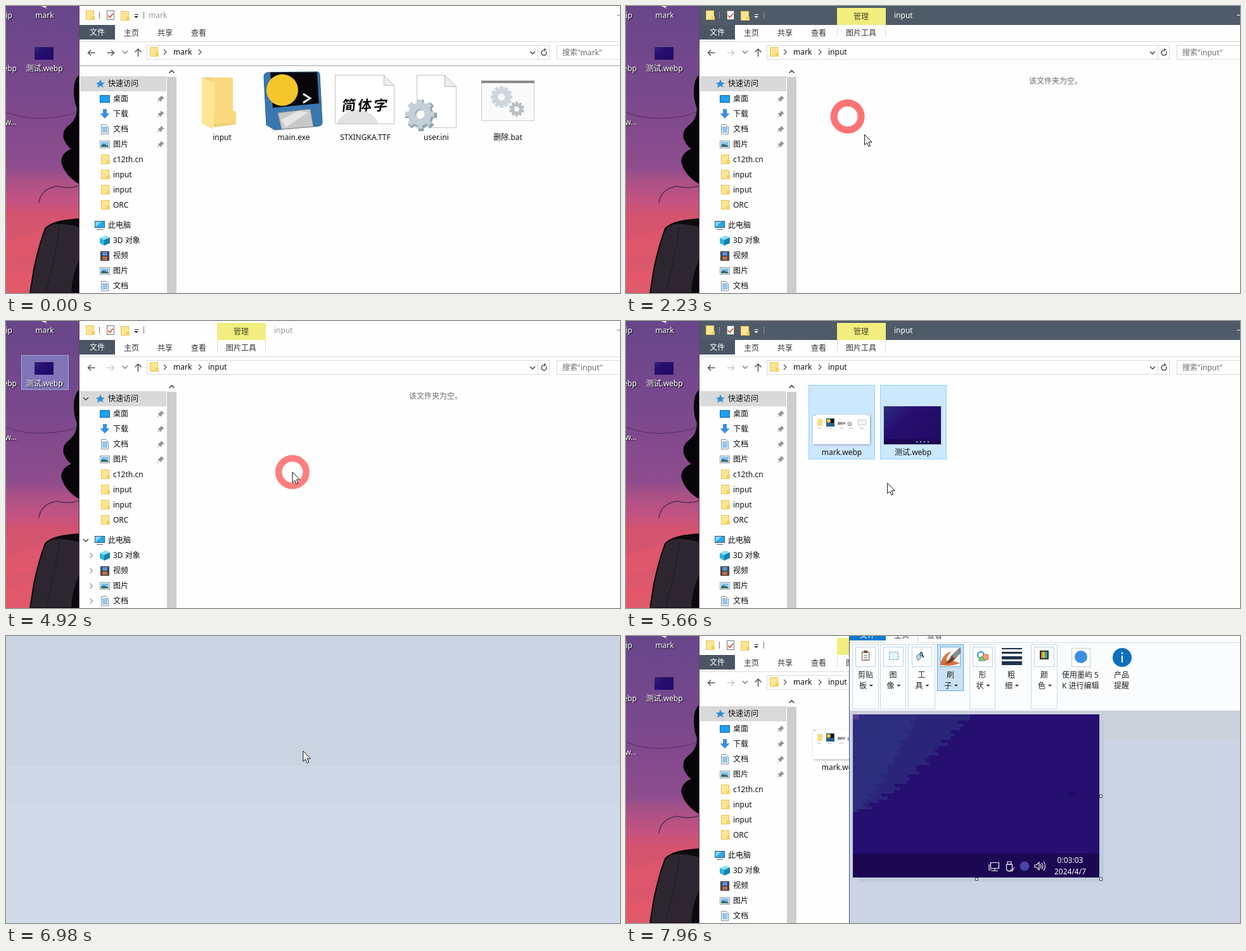
An HTML page with a canvas for the animation above (8000 ms loop, 969 by 454 pixels).

```html
<!DOCTYPE html>
<html lang="zh-CN">
<head>
<meta charset="utf-8">
<style>
html,body{margin:0;width:100%;height:100%;overflow:hidden;background:#fff}
canvas{display:block}
</style>
</head>
<body>
<canvas id="stage" width="969" height="454"></canvas>
<script>
const W = 969, H = 454, LOOP = 8000;
const c = document.getElementById('stage').getContext('2d');
const FONT = '"Noto Sans","Noto Sans CJK SC",sans-serif';

function box(x, y, w, h, fill, stroke) {
  if (fill) { c.fillStyle = fill; c.fillRect(x, y, w, h); }
  if (stroke) { c.strokeStyle = stroke; c.lineWidth = 1; c.strokeRect(x + .5, y + .5, w - 1, h - 1); }
}
function path(d, fill, stroke, lw = 1) {
  const p = new Path2D(d);
  if (fill) { c.fillStyle = fill; c.fill(p); }
  if (stroke) { c.strokeStyle = stroke; c.lineWidth = lw; c.stroke(p); }
}
function at(x, y, draw) {
  c.save(); c.translate(x, y); draw(); c.restore();
}
// y is the middle of the line; the baseline sits on a whole pixel
function text(s, x, y, color = '#111', align = 'left', font = '12px') {
  c.font = font + ' ' + FONT; c.textAlign = align; c.fillStyle = color;
  c.fillText(s, x, Math.round(y + 4));
}
function disc(x, y, r, fill, stroke, lw = 1) {
  c.beginPath(); c.arc(x, y, r, 0, 7);
  if (fill) { c.fillStyle = fill; c.fill(); }
  if (stroke) { c.strokeStyle = stroke; c.lineWidth = lw; c.stroke(); }
}
function shade(x0, y0, x1, y1, stops) {
  const g = c.createLinearGradient(x0, y0, x1, y1);
  stops.forEach(([p, col]) => g.addColorStop(p, col));
  return g;
}
const clamp = v => Math.max(0, Math.min(1, v));

// ---- pointer motion: time, x, y ----
const track = [
  [180, 700, 476], [520, 457, 290], [1000, 457, 285], [1340, 80, 210], [1440, 84, 200],
  [1760, 341, 152], [2150, 341, 152], [2190, 349, 174], [2230, 376, 203], [2310, 420, 229],
  [2560, 459, 245], [2670, 459, 245], [3000, 300, 190], [3300, 90, 100], [3470, 75, 125],
  [3500, 75, 125], [3560, 47, 95], [3600, 37, 86], [3700, 18, 76], [3900, 8, 72],
  [4400, 8, 72], [4720, 452, 239], [5300, 452, 239], [5560, 400, 290], [5800, 430, 210],
  [6080, 469, 182], [7300, 469, 182], [7320, 440, 60], [7340, 433, -24]
];
function pointer(t) {
  let i = track.findIndex(k => k[0] > t);
  if (i < 0) i = track.length;
  if (!i) return track[0].slice(1);
  const a = track[i - 1], b = track[i] || a;
  const p = b === a ? 0 : (t - a[0]) / (b[0] - a[0]);
  return [a[1] + (b[1] - a[1]) * p, a[2] + (b[2] - a[2]) * p];
}
const clicks = [550, 1850, 2095, 3500, 4760, 6300, 6480], FADE = 430;

function clickRing(t) {
  const last = clicks.filter(k => k <= t).pop();
  if (last === undefined || t - last > FADE) return;
  const age = (t - last) / FADE, [x, y] = pointer(t - 40);
  const inner = 13.5 + Math.min(3, age * 8);
  disc(x, y, (27 + inner) / 2, null, `rgba(255,0,0,${.8 * (1 - age)})`, 27 - inner);
}
function arrow(t) {
  const [x, y] = pointer(t);
  at(x, y, () => path('M0 0V16.5L3.8 13L6.4 19L9 17.9L6.4 12H11.5Z', '#fff', '#111'));
  if (t >= 6490 && t < 6980) {
    disc(x + 14, y, 6, null, '#e8f4ff', 5);
    disc(x + 14, y, 6, null, '#1d8be8', 3);
  }
}

// ---- desktop ----
function label(s, x, y, align = 'center') {
  c.shadowColor = '#000'; c.shadowBlur = 2; c.shadowOffsetX = c.shadowOffsetY = 1;
  text(s, x, y, '#fff', align);
  c.shadowColor = 'transparent';
}
function navy(x, y, w, h) {
  box(x, y, w, h, shade(x, y, x + w * .6, y + h, [[0, '#2d2b7b'], [.45, '#260f70'], [1, '#220c66']]));
}
function desktop(t) {
  box(0, 0, 116, H, shade(0, 0, 0, H, [
    [0, '#68468a'], [.3, '#79488c'], [.56, '#8e4c8d'], [.6, '#a65088'],
    [.68, '#c45380'], [.73, '#d4546f'], [.86, '#d9566c'], [1, '#e05a6a']]));
  path('M0 372Q35 362 62 350L40 398Q20 392 0 402ZM0 425Q25 415 46 420L42 436L0 446Z', 'rgba(236,90,104,.35)');
  path('M0 168Q35 182 78 176T116 160', null, 'rgba(60,36,64,.65)');
  path('M52 312Q54 290 80 285Q100 290 116 284', null, 'rgba(60,36,64,.75)', 1.5);
  path('M116 108Q107 116 107 134Q107 150 112 162Q112 178 100 188Q88 196 91 210Q96 222 103 226Q88 232 87 246Q92 268 116 282Z', '#070508');
  path('M116 338Q76 338 62 352Q52 378 44 416L38 454H116Z', '#2d2630', '#0a080b', 2);
  path('M116 336Q82 338 70 346Q92 343 116 350ZM116 400Q104 425 103 454H116Z', '#0c0a0d');
  path('M84 350Q80 390 62 454', null, '#211b25', 1.5);

  const picked = t >= 3500 && t < 4960;
  if (picked || (t > 3280 && t < 3470)) box(24, 54, 75, 55, 'rgba(150,180,245,.42)', 'rgba(175,205,245,.6)');
  if (picked && pointer(t)[0] < 22) box(-30, 54, 53, 55, 'rgba(150,180,245,.42)', 'rgba(175,205,245,.6)');

  path('M55 0H65L62 2L66 5L60 2Z', '#eee');
  label('ip', 10, 15, 'right');
  label('mark', 61, 15);
  navy(45, 65, 30, 20);
  label('ebp', 17, 99, 'right');
  label('测试.webp', 60.5, 99);
  label('w...', 17, 184, 'right');

  if (t >= 3500 && t < 4210) {
    const [x, y] = pointer(t);
    box(x, y, 75 - x, 126 - y, 'rgba(0,100,215,.3)', '#0a78d7');
  }
}

// ---- small icons ----
function folder(x, y) {
  box(x, y, 13, 15, '#ffe590', '#e8c458');
  path(`M${x + 9} ${y + 15}V${y + 9}H${x + 14}V${y + 15}Z`, '#f3cf62');
}
function picture(y) {
  box(148, y - 6, 16, 12, '#fff', '#8a979f');
  box(150, y - 4, 12, 8, '#7ec3ef');
  path(`M150 ${y + 4}V${y + 1}Q154 ${y - 3} 162 ${y + 3}V${y + 4}Z`, '#356b6c');
}
function doc(y) {
  path(`M150.5 ${y - 7.5}H158L161.5 ${y - 4}V${y + 7.5}H150.5Z`, '#fff', '#7d8c96');
  for (let i = 0; i < 5; i++) box(152, y - 4 + i * 2, 8, 1, '#2b8fd6');
}
function screen(x, y) {
  box(x, y - 7, 16, 11, '#28a8ea', '#31576f');
  path(`M${x + 1} ${y + 3}L${x + 11} ${y - 6}H${x + 1}Z`, '#7fd3fa');
  box(x + 3, y + 6, 10, 1, '#4d6675');
}
function chevron(x, y, d, color, lw = 1.3) {
  const m = { r: 'M-2 -4L2 0L-2 4', d: 'M-4 -2L0 2L4 -2', u: 'M-4 2L0 -2L4 2' };
  at(x, y, () => path(m[d], null, color, lw));
}
function gear(x, y, r, n, color) {
  at(x, y, () => {
    c.fillStyle = color;
    for (let i = 0; i < n; i++) { c.rotate(2 * Math.PI / n); c.fillRect(-r * .17, -r, r * .34, r * .4); }
  });
  disc(x, y, r * .56, null, color, r * .46);
}

// ---- file explorer ----
function chrome(active, inner) {
  box(116, 0, W - 116, H, '#fefefe');
  box(115, 0, 1, H, '#5a4a60');
  if (active) box(116, 0, W - 116, 30, '#4f5b69');
  const ink = active ? '#fff' : '#222', bar = active ? '#8d97a3' : '#777';
  folder(126, 7);
  box(147, 9, 1, 11, bar);
  box(159, 7, 12, 15, '#fff', '#777');
  path('M161 15L164 18L169 12', null, '#d44a2c', 1.7);
  folder(181, 8);
  box(203, 13, 6, 1, ink);
  path('M202 16H209L205.5 19Z', ink);
  box(217, 9, 1, 11, bar);
  if (inner) {
    box(333, 3, 77, 27, '#f1ed7e');
    text('管理', 371, 17, '#48482c', 'center');
    box(333, 30, 1, 20, '#ddd'); box(409, 30, 1, 20, '#ddd');
    text('图片工具', 347, 42.5, '#333');
  }
  text(inner ? 'input' : 'mark', inner ? 423 : 225, 15, active ? '#fff' : '#999');
  box(964, 14, 5, 1, active ? '#fff' : '#888');
  box(116, 30, 56, 23, '#4b5565');
  text('文件', 132, 42, '#fff');
  ['主页', '共享', '查看'].forEach((s, i) => text(s, 186 + 53 * i, 42.5, '#333'));
  box(116, 56, W - 116, 1, '#dadbdc');
  if (!inner) box(116, 94, W - 116, 1, '#a0a0a0');

  const left = 'M5.5 0H-5.5M-1 -4.5L-5.5 0L-1 4.5';
  at(135, 74, () => path(left, null, '#555', 1.5));
  at(165, 74, () => { c.scale(-1, 1); path(left, null, inner ? '#ccc' : '#555', 1.5); });
  chevron(188, 73, 'd', '#777');
  path('M208.5 80V68M203.5 73L208.5 68L213.5 73', null, '#555', 1.5);
  box(222, 62, 636, 23, '#fff', '#d9d9d9');
  box(839, 62, 1, 23, '#d9d9d9');
  folder(227, 65);
  chevron(251, 73, 'r', '#555'); text('mark', 264, 73);
  chevron(306, 73, 'r', '#555');
  if (inner) text('input', 319, 73);
  chevron(831, 74, 'd', '#444', 1.5);
  c.beginPath(); c.arc(849, 74, 4, -.6, 4.6); c.strokeStyle = '#555'; c.lineWidth = 1.5; c.stroke();
  path('M849 67V72L853 69Z', '#555');
  box(869, 62, 120, 23, '#fff', '#d9d9d9');
  text(`搜索"${inner ? 'input' : 'mark'}"`, 878, 74, '#6d6d6d');
}

function nav(t) {
  box(254, 96, 15, 358, '#f1f1f1');
  box(254, 96, 15, 16, '#fff');
  box(254, 112, 15, 342, '#cdcdcd');
  chevron(261.5, 104, 'u', '#444', 1.6);
  box(117, 111, 136, 24, '#d9d9d9');
  path('M149 116L151 121L156 121.5L152 124.5L153.5 129L149 126.5L144 129.5L145.5 124.5L142 121.5L147 121Z', '#2d8fd9');
  text('快速访问', 161, 122.5);
  box(148, 141, 16, 12, '#1ba1f4', '#1264a0');
  path('M153 163H159V170H163.5L156 178L148.5 170H153Z', '#3a8ee0');
  doc(195); picture(219);
  ['桌面', '下载', '文档', '图片', 'c12th.cn', 'input', 'input', 'ORC'].forEach((s, i) => {
    const y = 147 + 24 * i;
    text(s, 169, y - .5);
    if (i > 3) folder(150, y - 8);
    else at(244, y, () => path('M1 -5L5 -1L3 -.5L1 2L.5 4L-4 -.5L-2 -1L.5 -3ZM-2 2L-5 5', '#8b959e', '#8b959e'));
  });
  screen(140, 347); text('此电脑', 161, 346.5);
  path('M148 367L157 363L164 366L155 370Z', '#8be0f2');
  path('M148 367L155 370V379L148 375Z', '#2bb5dc');
  path('M155 370L164 366V375L155 379Z', '#1580b0');
  box(149, 388, 14, 15, '#2b2b2b'); box(152, 389, 8, 6, '#5b8de0'); box(152, 396, 8, 6, '#b76c4c');
  for (let i = 0; i < 5; i++) { box(150, 389 + 3 * i, 1, 1, '#eee'); box(161, 389 + 3 * i, 1, 1, '#eee'); }
  picture(419); doc(443);
  ['3D 对象', '视频', '图片', '文档'].forEach((s, i) => text(s, 169, 370.5 + 24 * i));

  const show = (a, b) => clamp((t - a) / 150) * clamp((b - t) / 150);
  c.globalAlpha = show(1130, 1680) + show(2830, 3490) + show(4480, 5420);
  chevron(126, 123, 'd', '#444', 1.5); chevron(126, 347, 'd', '#444', 1.5);
  for (let i = 0; i < 4; i++) chevron(134.5, 371 + 24 * i, 'r', '#999');
  c.globalAlpha = 1;
}

function page(x, y, w, h, f) {
  path(`M${x} ${y}H${x + w - f}L${x + w} ${y + f}V${y + h}H${x}Z`, '#fff', '#c4c4c4');
  path(`M${x + w - f} ${y}V${y + f}H${x + w}Z`, '#eee', '#b8b8b8');
}
function bigFolder() {
  path('M323 113H358V184H363V187L330 192L309 180V113Z', '#f0d07a');
  path('M323 113H358V165L363 167V184L330 187Z', '#f8d97f');
  path('M309 113L329 122V173L327 195L309 186Z', '#ffe596');
}
function floppy() {
  path('M413 105L490 104Q495 104 495 108L499 184Q499 189 494 190L424 196L411 188L407 112Q407 106 413 105Z', '#3878b0', '#2a5c88');
  path('M417 105L491 105L494 154L421 161Z', '#07070b');
  path('M429 169L480 163L485 191L435 195Z', '#c8c8c8', '#8b8b8b');
  path('M434 180L461 166L477 168L442 192Z', '#e5e5e5');
  disc(436, 133, 25, '#f5c62a');
  path('M469 139L480 146L469 153', null, '#fff', 3);
}
function mark(x) {
  c.shadowColor = 'rgba(0,0,0,.35)'; c.shadowBlur = 3; c.shadowOffsetY = 1;
  box(x, 148, 90, 47, '#fff');
  c.shadowColor = 'transparent';
  box(x + 1, 149, 3, 1, '#888'); box(x + 85, 149, 3, 1, '#aaa');
  box(x + 7, 155, 8, 11, '#f9dc80');
  box(x + 21, 154, 13, 13, '#285f91'); box(x + 24, 155, 9, 6, '#111'); disc(x + 25, 158, 3, '#f5c62a');
  text('简体字', x + 45, 160, '#333', 'center', 'bold 4px');
  gear(x + 58, 163, 4, 8, '#a5b2bc');
  box(x + 71, 156, 13, 9, '#f5f5f5', '#ccc');
  for (const k of [10, 27, 45, 60, 77]) box(x + k - 3, 169, 6, 1, '#bbb');
}
function pick(x, strong) {
  box(x, 101, 105, 118, strong ? '#cce8ff' : '#e5f3ff', strong ? '#99d1ff' : null);
}
function files(t) {
  if (t < 2150) {
    const over = t > 1710;
    if (over) pick(288, t >= 1850);
    bigFolder(); floppy();
    page(519.5, 109.5, 93, 77, 16);
    path('M522 186A36 36 0 0 1 588 186Z', '#e3e3e3');
    [...'简体字'].forEach((s, i) => at(541 + 25 * i, 160, () => {
      c.transform(1, -.06, -.1, 1, 0, 0);
      text(s, 0, 1, '#0c0c0c', 'center', '600 22px');
    }));
    page(648.5, 109.5, 62, 83, 18);
    gear(655, 173, 25, 8, '#93a4b0'); gear(653, 171, 23, 8, '#c4d0d9');
    box(750, 119, 84, 63, '#fafafa', '#ccc'); box(750, 118, 84, 4, '#8a8a8a');
    gear(782, 144, 17, 12, '#ccd6de'); gear(806, 163, 12, 10, '#bcc0c4');
    ['input', 'main.exe', 'STXINGKA.TTF', 'user.ini', '删除.bat']
      .forEach((s, i) => text(s, 341 + 113 * i - (i > 2 ? 1 : 0), 207.5, '#111', 'center'));
  } else if (t < 5650) {
    text('该文件夹为空。', 636, 118.5, '#6d6d6d');
  } else {
    if (t < 6300) pick(288, true);
    if (t < 6930) pick(401, true);
    mark(295);
    box(406, 134, 92, 62, '#b9c8dc');
    navy(407, 135, 90, 60);
    box(407, 187, 90, 8, '#1c0852');
    for (let i = 0; i < 4; i++) box(458 + 6 * i, 190, 2, 2, '#aaa7cf');
    text('mark.webp', 340.5, 207.5, '#111', 'center');
    text('测试.webp', 453, 207.5, '#111', 'center');
  }
}
function explorer(t) {
  chrome((t >= 550 && t < 3500) || (t >= 4960 && t < 6930), t >= 2150);
  files(t);
  nav(t);
}

// ---- image editor ----
function backdrop() {
  box(0, 0, W, 205, '#cad3e1');
  box(0, 205, W, 60, '#cfd8e6');
  box(0, 265, W, 189, '#d1dae9');
}
function dragFrame(t) {
  const p = clamp((t - 7725) / 215), r = 731 + 769 * p, b = 322 + 190 * p;
  c.globalCompositeOperation = 'difference';
  c.strokeStyle = '#fff'; c.lineWidth = 4;
  c.strokeRect(r - 1148, b - 800, 1148, 800);
  c.globalCompositeOperation = 'source-over';
}
function tool(x, w, top, low, on) {
  const m = x + w / 2, edge = on ? '#67a9e0' : '#b9d5ee';
  if (on) box(x, 13, w, 74, '#c9e2f7', edge);
  else box(x, 13, w, 103, '#fbfdfe', '#cbd8e6');
  box(Math.round(m) - 16, 17, 32, 32, '#fcfdff', edge);
  caption(m, top, low);
}
function caption(m, top, low) {
  text(top, m - (top.length > 1 ? 12 : 6), 61.5, '#222');
  text(low, m - 10, 78.5, '#222');
  path(`M${m + 6} 77H${m + 12}L${m + 9} 80Z`, '#333');
}
function ribbon() {
  box(353, 0, W - 353, 118, '#fafcfd');
  box(353, 0, 57, 7, '#0b78d0');
  box(353, 10, 57, 1, '#d5dce4'); box(460, 0, 1, 11, '#d5dce4'); box(460, 10, 509, 1, '#d5dce4');
  text('文件', 369, -1.5, '#fff'); text('主页', 423, -1.5, '#333'); text('查看', 475, -1.5, '#333');
  tool(357, 42, '剪贴', '板'); tool(401, 41, '图', '像'); tool(445, 43, '工', '具');
  tool(491, 42, '刷', '子', true); tool(542, 41, '形', '状'); tool(639, 42, '颜', '色');
  box(372, 25, 12, 14, '#fff', '#705236'); box(375, 23, 6, 4, '#705236');
  for (let i = 0; i < 3; i++) box(375, 30 + 3 * i, 6, 1, '#777');
  c.setLineDash([2, 2]); path('M415.5 25.5H429.5V37.5H415.5Z', '#e5f4fd', '#1579bd'); c.setLineDash([]);
  text('A', 466, 30, '#2a4d7c', 'center', 'bold 13px');
  path('M458 32L463 28L466 34L461 39Z', '#bcd0df', '#677c8c');
  path('M497 41Q501 28 514 24Q504 34 506 39Q514 38 527 43Q512 49 497 46Z', '#d9713c');
  path('M527 19L513 32L518 37L528 26Z', '#8d8f96', '#5d5550');
  path('M514 31L519 36Q515 43 504 44Q510 38 514 31Z', '#7a3d22');
  disc(560, 30, 5, '#fff', '#2491d2', 2); box(563, 29, 9, 9, '#f0a878', '#cc6234');
  path('M556 39L561 32L567 39Z', '#8fce72', '#369049');
  [[19, 2], [25, 3], [32, 5], [40, 6]].forEach(([y, h]) => box(593, y, 32, h, '#20304f'));
  caption(608, '粗', '细');
  box(653, 23, 14, 14, '#333');
  const hues = shade(655, 0, 665, 0, [[0, '#e83b3b'], [.35, '#e5d435'], [.65, '#49b54c'], [1, '#3680e0']]);
  box(655, 25, 10, 10, hues);
  box(703, 19, 30, 30, '#fff', '#c9cdd2');
  disc(718, 33, 10, '#3b8fe0');
  text('使用墨屿 5', 688, 61.5, '#222'); text('K 进行编辑', 688, 78.5, '#222');
  disc(783, 34, 15, '#0d6fbe');
  box(782, 31, 2, 11, '#fff'); disc(783, 27, 1.5, '#fff');
  text('产品', 782, 61.5, '#222', 'center'); text('提醒', 782, 78.5, '#222', 'center');
}
function editor() {
  box(353, 118, W - 353, 336, '#cbd3e4');
  box(353, 118, W - 353, 44, '#cbd0da');
  ribbon();
  box(367, 134, 387, 255, '#c1cadb');
  box(358, 124, 389, 258, '#250f70');
  // lighter corner with a blocky diagonal edge
  for (let y = 0; y < 152; y += 5) {
    const w = 184 * Math.pow(1 - y / 155, .74) + 8 * Math.sin(y * 1.7);
    box(358, 124 + y, Math.round(w / 5) * 5, 5, '#2b257a');
    box(358, 124 + y, Math.round(w * .55 / 5) * 5, 5, '#2d2e7e');
  }
  box(358, 124, 10, 8, '#54418c');
  box(698, 248, 10, 4, '#1d0a61');
  box(358, 344, 389, 38, '#1c0753');
  path('M575.5 358.5H588.5V367.5H575.5ZM582 368V371M577 371.5H587M573 361V370H577', null, '#eee', 1.2);
  path('M602 357H608V361H602ZM600.5 361.5H609.5V370Q605 374 600.5 370ZM607 369L609 372L613 366', null, '#eee', 1.2);
  disc(629, 364, 7.5, '#4a43a5');
  path('M645 362H648L652 358V370L648 366H645ZM654 361Q656 364 654 367M656 359Q660 364 656 369M659 357Q664 364 659 371', null, '#eee', 1.2);
  text('0:03:03', 701, 355, '#fff', 'center'); text('2024/4/7', 701, 373, '#fff', 'center');
  [[747, 251], [551, 382], [747, 382]].forEach(([x, y]) => box(x, y, 5, 5, '#fff', '#444'));
  box(352, 0, 1, H, '#46546a');
}

function draw(t) {
  if (t >= 6930 && t < 7950) {
    if (t < 6980) box(0, 0, W, H, '#eef2f8');
    else backdrop();
    if (t >= 7680) dragFrame(t);
  } else {
    desktop(t);
    explorer(t);
    if (t >= 7950) editor();
  }
  clickRing(t);
  if (t >= 180) arrow(t);
}
let start;
function tick() {
  const now = performance.now();
  start ??= now;
  draw((now - start) % LOOP);
  requestAnimationFrame(tick);
}
tick();
</script>
</body>
</html>
```
